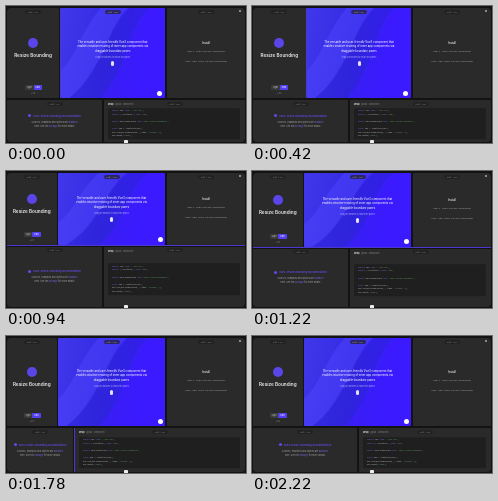
These frames come from a looping animation (240 by 137 pixels, 2.24 s). An HTML page:

```html
<!DOCTYPE html>
<html lang="en">
<head>
<meta charset="utf-8">
<title>Resizable panes</title>
<style>
html, body { margin: 0; width: 100%; height: 100%; overflow: hidden; background: #131313; }
#stage { position: absolute; width: 240px; height: 137px; overflow: hidden; font: 2.4px/4px Inter, sans-serif; color: #ddd; }
#stage * { box-sizing: border-box; }
.pane { position: absolute; overflow: hidden; background: #2a2a2a; border-radius: 1px; }
.top { top: 2px; height: calc(var(--h) - 3px); }
.low { top: calc(var(--h) + 1px); bottom: 1px; }
.intro { left: 1px; width: calc(var(--a) - 2px); border-top-left-radius: 4px; }
.hero { left: calc(var(--a) + .5px); width: calc(158.5px - var(--a)); background: linear-gradient(100deg, #4038ea, #3428e4 45%, #3a1cff 75%); }
.install { left: 161px; right: 1px; border-top-right-radius: 4px; }
.docs { left: 1px; width: calc(var(--b) - 2px); border-bottom-left-radius: 4px; }
.code { left: calc(var(--b) + 1px); right: 1px; border-bottom-right-radius: 4px; }
.center { position: absolute; inset: 0; display: flex; flex-direction: column; align-items: center; justify-content: center; text-align: center; }
.tag { position: absolute; top: 1.5px; left: calc(50% - 8px); width: 16px; height: 4px; border-radius: 2px; text-align: center; font-size: 1.7px; color: #888; background: #222; white-space: pre; }
.hero .tag { background: #2b2660; color: #aaa; }
.mark { position: absolute; left: calc(50% - 5px); top: calc(50% - 15px); width: 10px; height: 10px; border-radius: 50%; background: #5a46e8; }
h1 { position: absolute; left: 0; right: 0; top: calc(50% - 1px); margin: 0; font: 600 4.7px/6px Inter, sans-serif; text-align: center; white-space: nowrap; color: #eee; }
.modes { position: absolute; left: calc(50% - 8px); bottom: 8px; width: 17px; height: 5px; display: flex; border-radius: 1px; background: #393939; font-size: 2px; line-height: 5px; text-align: center; }
.modes span { flex: 1; }
.modes .on { background: #5540f0; border-radius: 1px; color: #fff; }
.version { position: absolute; left: 0; right: 0; bottom: 3px; text-align: center; font-size: 1.8px; color: #999; }
.hero svg { position: absolute; inset: 0; width: 100%; height: 100%; }
.hero p { margin: 0; max-width: 79px; padding: 0 3px; font-size: 2.75px; line-height: 4.4px; font-weight: 500; color: #f3f1ff; }
.hero small { margin-top: 2.5px; font-size: 2px; line-height: 3px; color: #bdb5ff; }
.mouse { width: 3px; height: 5px; margin-top: 2.5px; border-radius: 1.5px; background: #e4e0ff; }
.dot { position: absolute; right: 2.5px; bottom: 2.5px; width: 5px; height: 5px; border-radius: 50%; background: #fff; }
.install .center { padding-bottom: 2px; }
.install b { font-weight: 600; font-size: 2.8px; margin-bottom: 4.5px; }
.install code { font: 2.4px/4px "Noto Sans Mono", monospace; color: #aaa; white-space: nowrap; }
.install code + code { margin-top: 6px; }
.moon { position: absolute; right: 4px; top: 2px; width: 2px; height: 2px; border-radius: 50%; background: #aaa; }
.docs b { color: #5f4be6; font-weight: 600; font-size: 2.6px; white-space: nowrap; margin-bottom: 3px; }
.docs b::before { content: ""; display: inline-block; width: 3px; height: 3px; margin-right: 2px; vertical-align: middle; border-radius: 50%; background: #5f4be6; }
.docs p { margin: 0; width: 48px; font-size: 2.2px; color: #aaa; }
i { font-style: normal; color: #7564e0; }
u { text-decoration: none; color: #5fa05f; }
.tabs { position: absolute; left: 4px; top: 2px; font-size: 2px; color: #888; white-space: pre; }
.tabs b { color: #eee; }
pre { position: absolute; left: 4px; right: 5px; top: calc(50% + 2.5px); transform: translateY(-50%); margin: 0; padding: 1.5px 4px; border-radius: 1px; background: #1f1f1f; font: 1.9px/3.6px "Noto Sans Mono", monospace; color: #b5b5b5; }
.line { position: absolute; background: #4b38d0; }
#lineA { left: calc(var(--a) - .5px); top: 2px; width: 1px; height: calc(var(--h) - 3px); }
#lineH { left: 1px; right: 1px; top: calc(var(--h) - .5px); height: 1px; }
#lineB { left: calc(var(--b) - .5px); top: calc(var(--h) + 1px); bottom: 1px; width: 1px; }
.grip { position: absolute; left: 118px; bottom: 0; width: 4px; height: 3px; border-radius: 1px 1px 0 0; background: #eee; }
</style>
</head>
<body>
<div id="stage">
  <section class="pane top intro">
    <div class="tag">width  /  min</div>
    <div class="mark"></div>
    <h1>Resize Bounding</h1>
    <div class="modes"><span>Light</span><span class="on">Dark</span></div>
    <div class="version">v 2.0</div>
  </section>
  <section class="pane top hero">
    <svg viewBox="0 0 100 90" preserveAspectRatio="none">
      <path d="M0 62C14 50 20 22 38 0H64C44 20 40 62 8 90H0Z" fill="#5148ff" opacity=".45"/>
      <path d="M8 90C40 66 42 24 66 0H84C62 22 66 60 38 90Z" fill="#2a1fd0" opacity=".4"/>
      <path d="M38 90C64 62 64 24 86 0H100V90Z" fill="#3d18ff" opacity=".5"/>
    </svg>
    <div class="tag">width  /  max</div>
    <div class="center">
      <p>The versatile and user-friendly Vue3 component that enables intuitive resizing of inner app components via draggable boundary panes</p>
      <small>Drag the borders to resize the panes</small>
      <div class="mouse"></div>
    </div>
    <div class="dot"></div>
  </section>
  <section class="pane top install">
    <div class="tag">width  /  auto</div>
    <div class="moon"></div>
    <div class="center"><b>Install</b><code>npm i vue3-resize-bounding</code><code>yarn add vue3-resize-bounding</code></div>
  </section>
  <section class="pane low docs">
    <div class="tag">width  /  min</div>
    <div class="center"><b>vue3-resize-bounding documentation</b><p>Sources, examples and options are <i>available</i> here. See the <i>package</i> for more details</p></div>
  </section>
  <section class="pane low code">
    <div class="tabs"><b>setup</b>   global   component</div>
    <div class="tag">width  /  max</div>
    <pre><i>import</i> App <i>from</i> <u>"./App.vue"</u>;
<i>import</i> { createApp } <i>from</i> <u>"vue"</u>;

<i>import</i> ResizeBounding <i>from</i> <u>"vue3-resize-bounding"</u>;

<i>const</i> app = createApp(App);
app.use(ResizeBounding, { name: <u>"resize"</u> });
app.mount(<u>"#app"</u>);</pre>
  </section>
  <div class="line" id="lineA"></div>
  <div class="line" id="lineH"></div>
  <div class="line" id="lineB"></div>
  <div class="grip"></div>
</div>
<script>
const LOOP = 2240;
const stage = document.getElementById("stage");

// Drag path of each divider: [time in ms, position in px]
const drags = {
  a: [[0, 54], [220, 99], [460, 51.5]],
  h: [[560, 93], [1060, 72], [1540, 91]],
  b: [[1440, 97], [1780, 68], [2200, 106]]
};

function position(path, t) {
  let [t0, p0] = path[0];
  for (const [t1, p1] of path) {
    if (t < t1) {
      const u = Math.max(0, (t - t0) / (t1 - t0 || 1));
      return p0 + (p1 - p0) * Math.sin(u * Math.PI / 2) ** 2;
    }
    [t0, p0] = [t1, p1];
  }
  return p0;
}

function draw(now) {
  const t = now % LOOP;
  for (const [key, path] of Object.entries(drags)) {
    stage.style.setProperty("--" + key, position(path, t) + "px");
    const active = t > path[0][0] && t < path[2][0];
    document.getElementById("line" + key.toUpperCase()).style.opacity = active ? 1 : 0;
  }
  requestAnimationFrame(draw);
}
draw(performance.now());
</script>
</body>
</html>
```
